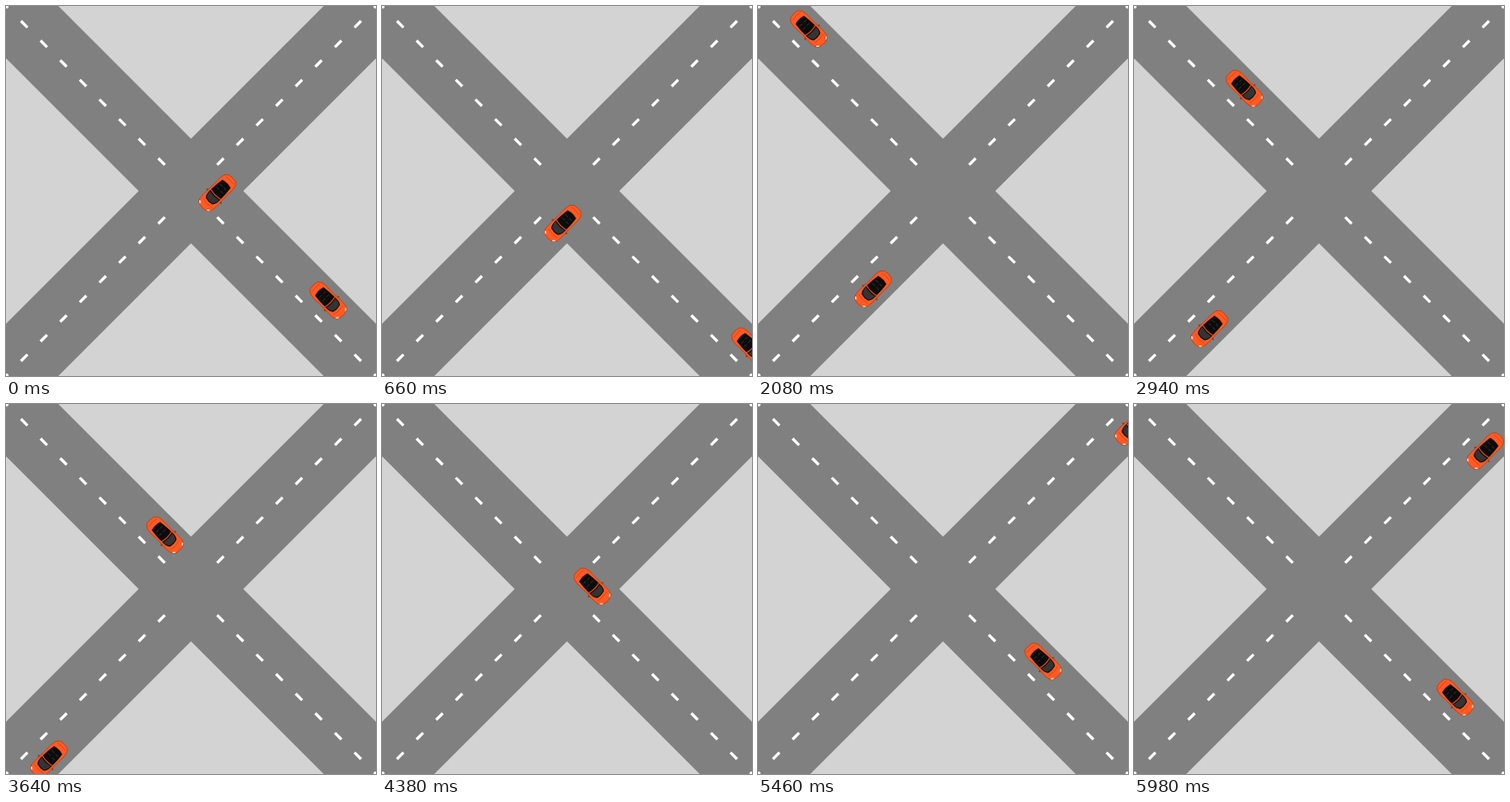
An HTML page with a canvas for the animation above (6000 ms loop, 400 by 400 pixels).

```html
<!DOCTYPE html>
<html>
<head>
<meta charset="utf-8">
<style>
html, body { margin: 0; width: 100%; height: 100%; overflow: hidden; background: #d3d3d3; }
canvas { display: block; }
</style>
</head>
<body>
<canvas id="stage" width="400" height="400"></canvas>
<script>
const ctx = document.getElementById('stage').getContext('2d');
const LOOP = 6000;

function place(x, y, angle, draw) {
  ctx.save();
  ctx.translate(x, y);
  ctx.rotate(angle);
  draw();
  ctx.restore();
}

function shape(path, fill, stroke, width = 1) {
  const p = new Path2D(path);
  if (fill) { ctx.fillStyle = fill; ctx.fill(p); }
  if (stroke) { ctx.strokeStyle = stroke; ctx.lineWidth = width; ctx.stroke(p); }
}

function asphalt() {
  ctx.fillStyle = '#808080';
  ctx.fillRect(-300, -40, 600, 80);
}

function dashes() {
  ctx.fillStyle = '#fff';
  for (let d = 40; d < 300; d += 30) {
    ctx.fillRect(d, -1.5, 10, 3);
    ctx.fillRect(-d - 10, -1.5, 10, 3);
  }
}

// Convertible seen from above, nose along +x
function car() {
  shape('M4-9L5.5-11.2M4 9L5.5 11.2', null, '#a5340c', 1.8);
  shape('M-14-9.6Q-5-9.2 3-9.3Q12-10.2 17-9.2Q20.5-8.4 22-5Q23.6 0 22 5Q20.5 8.4 17 9.2' +
    'Q12 10.2 3 9.3Q-5 9.2-14 9.6Q-20 9.4-22.6 5.4Q-24 0-22.6-5.4Q-20-9.4-14-9.6Z', '#ff5a24', '#b93a0c', 0.7);
  shape('M-14-6.4Q-6-7.6 3-7.6Q10-7.8 12.5-5Q14 0 12.5 5Q10 7.8 3 7.6Q-6 7.6-14 6.4Q-16 0-14-6.4Z', '#0c0c0c');
  shape('M4-6.9Q9-7 11.5-4.5Q13 0 11.5 4.5Q9 7 4 6.9Q6 0 4-6.9Z', '#343434');
  shape('M-9-5V-1M-9 1V5M-4-5V-1M-4 1V5', null, '#2b2b2b');
  shape('M2-8.5Q4.5 0 2 8.5', null, '#e04a18', 1.2);
  shape('M15-7Q17 0 15 7M-19-6Q-20.5 0-19 6', null, '#d8440f', 0.8);
  shape('M19-7.6L21-5.2M19 7.6L21 5.2', null, '#fff0e4', 1.2);
}

function draw(t) {
  ctx.fillStyle = '#d3d3d3';
  ctx.fillRect(0, 0, 400, 400);
  const roads = [Math.PI / 4, -Math.PI / 4];
  for (const layer of [asphalt, dashes])
    for (const angle of roads) place(200, 200, angle, layer);

  // Each car re-enters from the far side while out of view
  const ax = t < 1200 ? 348.5 + 0.075 * t : 0.075 * t - 101;
  const bx = t < 4800 ? 228.4 - 0.05 * t : 678.6 - 0.05 * t;
  place(ax, ax - 30.2, Math.PI / 4, car);
  place(bx, 430.5 - bx, Math.PI * 3 / 4, car);
}

function frame() {
  const t = performance.now() % LOOP;
  draw(Math.floor(t / 20) * 20);
  requestAnimationFrame(frame);
}
frame();
</script>
</body>
</html>
```
